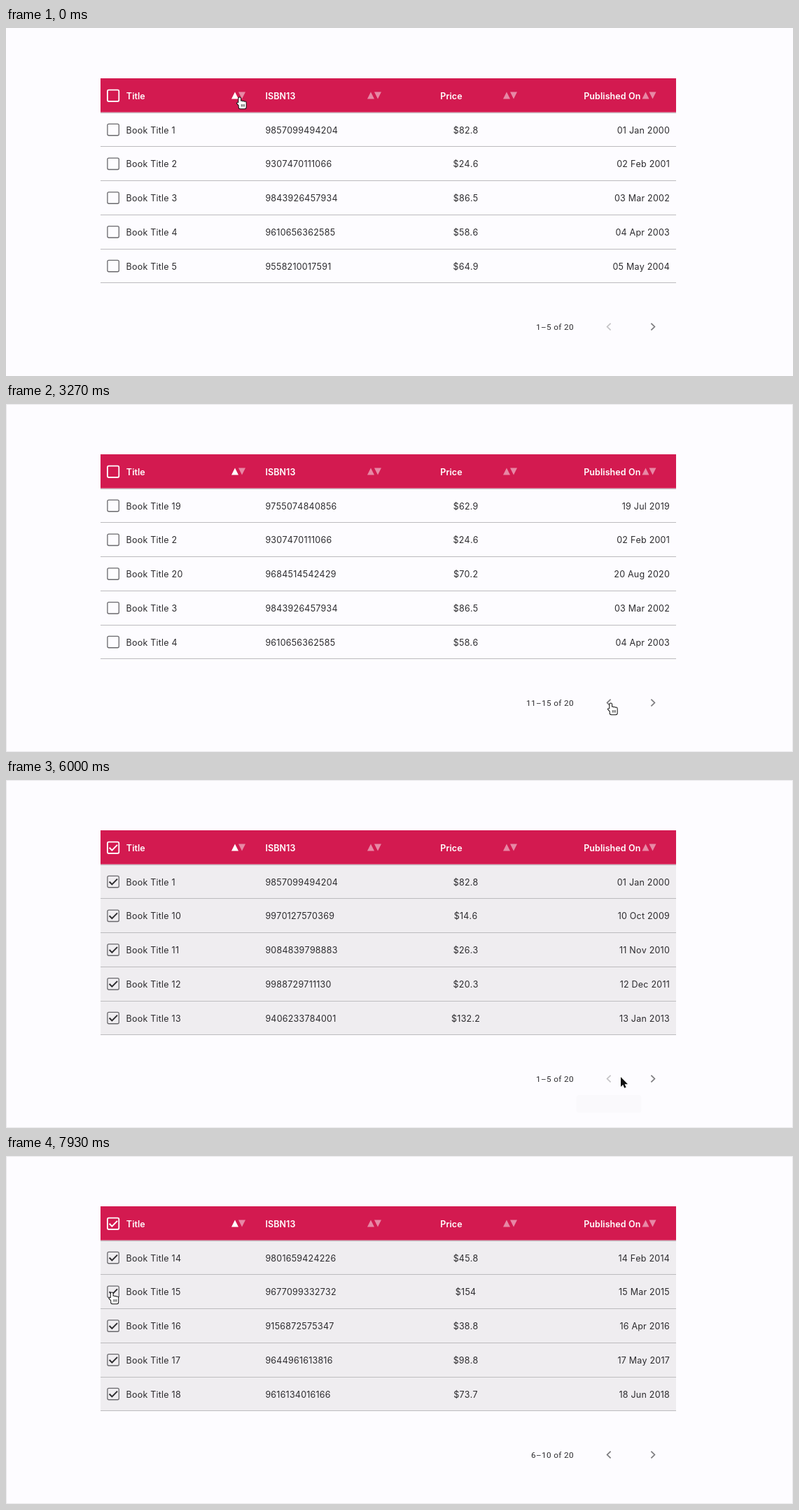
An HTML page with a canvas for the animation above (8000 ms loop, 1124 by 498 pixels).

```html
<!DOCTYPE html>
<html lang="en">
<head>
<meta charset="utf-8">
<title>Sortable table</title>
<style>
  html, body { margin: 0; width: 100%; height: 100%; overflow: hidden; background: #fdfcff; }
  canvas { display: block; }
</style>
</head>
<body>
<canvas id="stage" width="1124" height="498"></canvas>
<script>
const ctx = document.getElementById('stage').getContext('2d');
const LOOP = 8000, STEP = 200 / 3;
const LEFT = 135, RIGHT = 957, TOP = 72, ROW = 48.75;
const INK = '#2c2b2e', RED = '#d31a50';
const PREV = 861, NEXT = 924, PAGER_Y = 427.5;
const MONTHS = 'Jan Feb Mar Apr May Jun Jul Aug Sep Oct Nov Dec'.split(' ');

let seed = 7;
const random = () => (seed = seed * 16807 % 2147483647) / 2147483647;
const randomBook = () => `9${String(random()).slice(2, 14).padEnd(12, '0')} ${(20 + random() * 79).toFixed(1)}`;

// books that are never on screen for long get random details
const known = {
  1: '9857099494204 82.8', 2: '9307470111066 24.6', 3: '9843926457934 86.5',
  4: '9610656362585 58.6', 5: '9558210017591 64.9', 10: '9970127570369 14.6',
  11: '9084839798883 26.3', 12: '9988729711130 20.3', 13: '9406233784001 132.2',
  14: '9801659424226 45.8', 15: '9677099332732 154', 16: '9156872575347 38.8',
  17: '9644961613816 98.8', 18: '9616134016166 73.7'
};
const books = Array.from({ length: 20 }, (_, i) => {
  const n = i + 1, [isbn, price] = (known[n] || randomBook()).split(' ');
  const year = 1999 + n + (n > 12);
  return {
    title: 'Book Title ' + n, isbn, price: '$' + price,
    date: `${String(n).padStart(2, '0')} ${MONTHS[i % 12]} ${year}`
  };
});
const asc = [...books].sort((a, b) => a.title < b.title ? -1 : 1);
const desc = [...asc].reverse();

const FRAME_AT = 270;
const clicks = { desc: 470, asc: 930, select: 5270, next: [2400, 2800, 6330], prev: [3670, 4340] };

// leave, arrive, x, y of the pointer's hot spot
const moves = [
  [0, 0, 334, 100], [70, 130, 338.5, 97],
  [1400, 1730, 866, 427], [1730, 2270, 922.5, 433], [3000, 3270, 864, 429],
  [4340, 5130, 155.5, 96], [5400, 6000, 878, 425], [6000, 6130, 921, 432],
  [6930, 7130, 277.5, 297], [7130, 7930, 151.5, 196]
];

// from, to, button
const tips = [
  [2270, 2400, NEXT], [3330, 3700, PREV], [5998, 6070, PREV],
  [6170, 6400, NEXT], [7000, 7290, PREV]
];

function text(str, x, y, { align = 'left', size = 12.5, weight = 400, family = 'Inter', color = INK, gap = 0.22 } = {}) {
  ctx.font = `${weight} ${size}px ${family}, sans-serif`;
  ctx.fontKerning = 'none';
  ctx.letterSpacing = gap + 'px';
  ctx.textAlign = align;
  ctx.fillStyle = color;
  ctx.fillText(str, x, y);
}

function polyline(points, color, width) {
  ctx.beginPath();
  points.forEach(([x, y]) => ctx.lineTo(x, y));
  ctx.strokeStyle = color;
  ctx.lineWidth = width;
  ctx.stroke();
}

function triangle(x, dir, on) {
  const y = 96.6;
  ctx.beginPath();
  ctx.moveTo(x - 5, y + 5 * dir);
  ctx.lineTo(x + 5, y + 5 * dir);
  ctx.lineTo(x, y - 5 * dir);
  ctx.fillStyle = on ? '#fff' : '#e788a5';
  ctx.fill();
}

function sorter(x, order) {
  triangle(x, 1, order === 'asc');
  triangle(x + 10, -1, order === 'desc');
}

function checkbox(y, checked, color, width) {
  ctx.beginPath();
  ctx.roundRect(144.9, y - 8.1, 16.4, 16.4, 2);
  ctx.strokeStyle = color;
  ctx.lineWidth = width;
  ctx.stroke();
  if (checked) polyline([[147.6, y], [151.4, y + 3.9], [159, y - 3.8]], color === '#fff' ? color : INK, 2);
}

function header(order, checked) {
  ctx.fillStyle = RED;
  ctx.fillRect(LEFT, TOP, RIGHT - LEFT, 48.6);
  checkbox(96.7, checked, '#fff', 1.8);
  const style = { weight: 600, color: '#fff', gap: 0.09 };
  text('Title', 171.8, 101.5, style);
  text('ISBN13', 370.4, 101.5, style);
  text('Price', 636, 101.5, { ...style, align: 'center' });
  text('Published On', 906.4, 101.5, { ...style, align: 'right' });
  sorter(327, order);
  [521, 715, 913.5].forEach(x => sorter(x));
}

function row(book, i, checked) {
  const y = TOP + ROW * (i + 1), base = y + 29.9;
  if (checked) {
    ctx.fillStyle = '#efedf0';
    ctx.fillRect(LEFT, y, RIGHT - LEFT, ROW);
  }
  checkbox(y + 24.7, checked, '#69686c', 1.3);
  text(book.title, 171.6, base);
  text(book.isbn, 370.4, base);
  text(book.price, 656.6, base, { align: 'center' });
  text(book.date, 948, base, { align: 'right' });
}

const small = { family: 'Roboto', size: 11.7, gap: 0.39 };

function chevron(x, dir, on) {
  polyline([[x - 2.6 * dir, PAGER_Y - 4.8], [x + 2.4 * dir, PAGER_Y], [x - 2.6 * dir, PAGER_Y + 4.8]],
    on ? '#7b7a7e' : '#c4c3c6', 1.7);
}

function pager(page) {
  const first = page * 5 + 1;
  text(`${first}–${first + 4} of 20`, 811, 431.6, { ...small, align: 'right' });
  chevron(PREV, -1, page > 0);
  chevron(NEXT, 1, page < 3);
}

function tooltip(t, [from, to, x]) {
  const alpha = Math.min((t - from) / 100, (to - t) / 70, 1);
  if (alpha <= 0) return;
  const w = x === PREV ? 93 : 72;
  ctx.globalAlpha = alpha;
  ctx.fillStyle = '#717073';
  ctx.beginPath();
  ctx.roundRect(x - w / 2, 451, w, 25, 3.6);
  ctx.fill();
  text(x === PREV ? 'Previous page' : 'Next page', x + 0.2, 467.6, { ...small, align: 'center', color: '#fff' });
  ctx.globalAlpha = 1;
}

function pointerAt(t) {
  const i = moves.findLastIndex(m => t >= m[0]);
  const [leave, arrive, x, y] = moves[i];
  if (t >= arrive) return [x, y];
  const [, , x0, y0] = moves[i - 1];
  const u = (t - leave) / (arrive - leave), e = u * u * (3 - 2 * u);
  return [x0 + (x - x0) * e, y0 + (y - y0) * e];
}

function handShape() {
  const p = new Path2D();
  p.roundRect(3.6, 1, 2.8, 11, 1.4);
  for (let i = 0; i < 3; i++) p.roundRect(6.2 + 2.5 * i, 6 + 0.5 * i, 2.8, 7, 1.4);
  p.roundRect(4, 9, 10, 7.6, 2);
  p.moveTo(1.2, 9);
  p.lineTo(2.8, 8.2);
  p.lineTo(5, 10.5);
  p.lineTo(5.5, 14);
  p.closePath();
  return p;
}
const hand = handShape();
const arrow = new Path2D('M0 0V14L3.2 11L5.2 15.8L7.6 14.8L5.6 10.2H10Z');

function outlined(shape, fill, edge) {
  ctx.strokeStyle = edge;
  ctx.lineWidth = 2;
  ctx.lineJoin = 'round';
  ctx.stroke(shape);
  ctx.lineJoin = 'miter';
  ctx.fillStyle = fill;
  ctx.fill(shape);
}

function pointer(t) {
  const [x, y] = pointerAt(t);
  const onTable = x > LEFT && x < RIGHT && y > TOP && y < 365;
  const onButton = [PREV, NEXT].some(b => Math.hypot(x - b, y - PAGER_Y) < 16);
  ctx.save();
  if (onTable || onButton) {
    ctx.translate(x - 5.3, y - 1.4);
    outlined(hand, '#fff', '#111');
    for (let i = 0; i < 3; i++) polyline([[7.6 + 2 * i, 10.5], [7.6 + 2 * i, 14]], '#111', 0.8);
  } else {
    ctx.translate(x, y);
    outlined(arrow, '#111', '#fff');
  }
  ctx.restore();
}

function draw(t) {
  const done = times => times.filter(c => t >= c).length;
  const page = done(clicks.next) - done(clicks.prev);
  const list = t >= clicks.asc ? asc : t >= clicks.desc ? desc : books;
  const selected = t >= clicks.select;
  ctx.fillStyle = '#fdfcff';
  ctx.fillRect(0, 0, 1124, 498);
  if (t >= FRAME_AT) {
    ctx.strokeStyle = '#e9e8eb';
    ctx.lineWidth = 1;
    ctx.strokeRect(0.5, 0.5, 1123, 497);
  }
  list.slice(page * 5, page * 5 + 5).forEach((book, i) => row(book, i, selected));
  header(list === desc ? 'desc' : 'asc', selected);
  ctx.fillStyle = '#bcbbbe';
  for (let i = 1; i <= 6; i++) ctx.fillRect(LEFT, Math.floor(TOP + ROW * i + 0.25), RIGHT - LEFT, 1);
  pager(page);
  tips.forEach(tip => tooltip(t, tip));
  pointer(t);
}

const start = performance.now();
function tick() {
  const now = (performance.now() - start) % LOOP;
  // 15 pictures a second, on a 10 ms clock
  const k = Math.floor((now + 4) / STEP) % 120;
  draw(Math.round(k * STEP / 10) * 10);
  requestAnimationFrame(tick);
}
tick();
</script>
</body>
</html>
```
